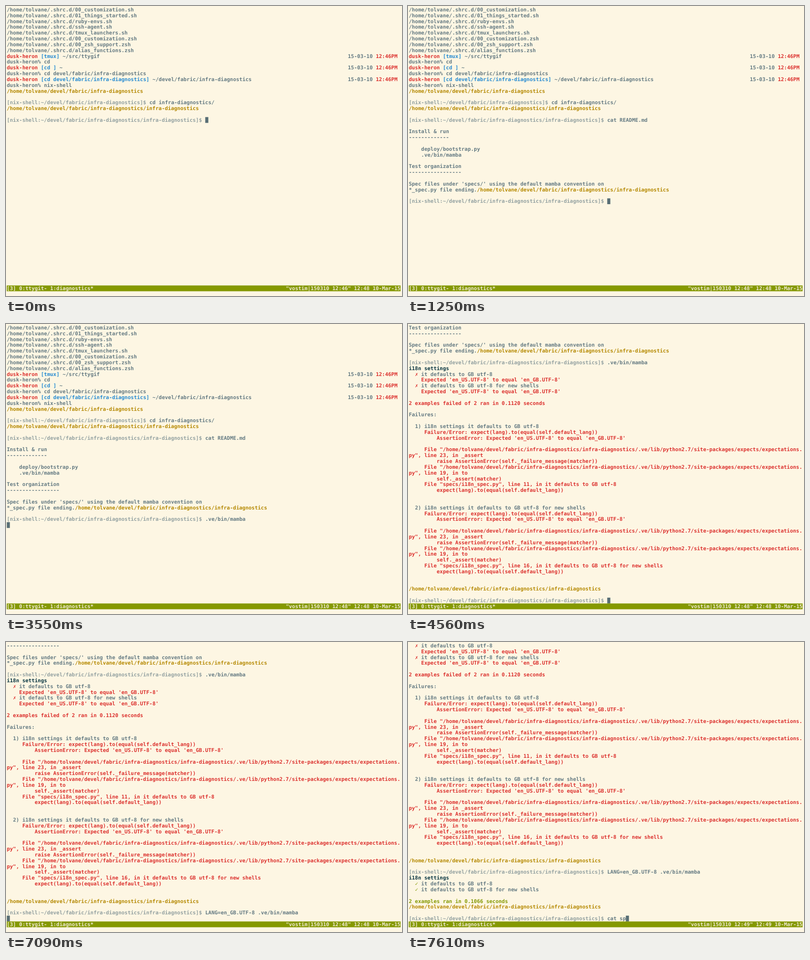
Write an HTML page that moves like this. It is 874 px wide and 641 px high and loops after 8 s.

```html
<!DOCTYPE html>
<html lang="en">
<head>
<meta charset="utf-8">
<title>Terminal session</title>
<style>
  html, body { margin: 0; width: 100%; height: 100%; overflow: hidden; background: #fdf6e3; }
  svg { display: block; }
  text {
    font: bold 11.37px "DejaVu Sans Mono", monospace;
    white-space: pre;
    text-rendering: geometricPrecision;
  }
</style>
</head>
<body>
<svg id="stage" width="874" height="641" viewBox="0 0 874 641"></svg>
<script>
(() => {
const LOOP = 8000, COLS = 127, ROWS = 48;
const CELL_W = 6.844, CELL_H = 12.833, MARGIN = 1.7, BASELINE = 10.27;
const stage = document.getElementById('stage');

// A line is a list of runs: [colour, text].
const ink = color => text => [color, text];
const base = ink('#657b83'), dim = ink('#93a1a1'), red = ink('#dc322f'), blue = ink('#268bd2');
const gold = ink('#b58900'), green = ink('#859900'), dark = ink('#073642'), pale = ink('#eee8d5');

const user = 'tolvane', host = 'dusk-heron';
const project = 'devel/fabric/infra-diagnostics';
const inner = project + '/infra-diagnostics';
const blank = [];
const plain = text => [base(text)];
const error = (indent, text) => [red(' '.repeat(indent) + text)];
const folder = path => [gold(`/home/${user}/${path}`)];
const prompt = (command, path = inner) => [dim(`[nix-shell:~/${path}]$ `), base(command)];

function banner(command, path) {
  const left = [red(host + ' '), blue(`[${command}]`), base(' ' + path)];
  return [...left, base(' '.repeat(110 - width(left)) + '15-03-10 '), red('12:46PM')];
}

function width(line) {
  return line.reduce((sum, [, text]) => sum + text.length, 0);
}

const startup = [
  ...['00_customization.sh', '01_things_started.sh', 'ruby-envs.sh', 'ssh-agent.sh', 'tmux_launchers.sh',
    '00_customization.zsh', '00_zsh_support.zsh', 'alias_functions.zsh']
    .map(file => plain(`/home/${user}/.shrc.d/${file}`)),
  banner('tmux', '~/src/ttygif'),
  plain(host + '% cd'),
  banner('cd ', '~'),
  plain(`${host}% cd ${project}`),
  banner('cd ' + project, '~/' + project),
  plain(host + '% nix-shell'),
  folder(project),
  blank,
  prompt('cd infra-diagnostics/', project),
  folder(inner),
  blank
];

const readme = [
  blank,
  plain('Install & run'),
  plain('-'.repeat(13)),
  blank,
  plain('    deploy/bootstrap.py'),
  plain('    .ve/bin/mamba'),
  blank,
  plain('Test organization'),
  plain('-'.repeat(17)),
  blank,
  plain("Spec files under 'specs/' using the default mamba convention on"),
  [base('*_spec.py file ending.'), ...folder(inner)],
  blank
];

const specs = ['it defaults to GB utf-8', 'it defaults to GB utf-8 for new shells'];
const mismatch = "Expected 'en_US.UTF-8' to equal 'en_GB.UTF-8'";
const result = (mark, spec) => [base('  '), mark, base(' ' + spec)];

function libraryCall(line, method, code) {
  return [
    error(5, `File "/home/${user}/${inner}/.ve/lib/python2.7/site-packages/expects/expectations.`),
    error(0, `py", line ${line}, in ${method}`),
    error(9, code)
  ];
}

function failure(number, spec, line) {
  return [
    plain(`  ${number}) i18n settings ${spec}`),
    error(5, 'Failure/Error: expect(lang).to(equal(self.default_lang))'),
    error(9, 'AssertionError: ' + mismatch),
    blank,
    ...libraryCall(23, '_assert', 'raise AssertionError(self._failure_message(matcher))'),
    ...libraryCall(19, 'to', 'self._assert(matcher)'),
    error(5, `File "specs/i18n_spec.py", line ${line}, in ${spec}`),
    error(9, 'expect(lang).to(equal(self.default_lang))'),
    blank,
    blank
  ];
}

const failedRun = [
  [dark('i18n settings')],
  ...specs.flatMap(spec => [result(red('✗'), spec), error(4, mismatch)]),
  blank,
  error(0, '2 examples failed of 2 ran in 0.1120 seconds'),
  blank,
  plain('Failures:'),
  blank,
  ...failure(1, specs[0], 11),
  ...failure(2, specs[1], 16),
  folder(inner),
  blank
];

const passedRun = [
  [dark('i18n settings')],
  ...specs.map(spec => result(green('✓'), spec)),
  blank,
  [green('2 examples ran in 0.1066 seconds')],
  folder(inner),
  blank
];

const run = '.ve/bin/mamba', runGB = 'LANG=en_GB.UTF-8 ' + run;
const afterReadme = [...startup, prompt('cat README.md'), ...readme];
const afterFailure = [...afterReadme, prompt(run), ...failedRun];
const afterPass = [...afterFailure, prompt(runGB), ...passedRun];

const step = (at, history, last, titleTime, clock) => ({ at, lines: [...history, last], titleTime, clock });
const steps = [
  step(0, startup, prompt(''), '12:46', '12:48'),
  step(500, startup, prompt('cat README.md'), '12:46', '12:48'),
  step(1250, afterReadme, prompt(''), '12:48', '12:48'),
  step(3510, afterReadme, prompt(run), '12:48', '12:48'),
  step(3550, [...afterReadme, prompt(run)], blank, '12:48', '12:48'),
  step(4560, afterFailure, prompt(''), '12:48', '12:48'),
  step(6930, afterFailure, prompt(runGB), '12:48', '12:48'),
  step(7090, [...afterFailure, prompt(runGB)], blank, '12:48', '12:48'),
  step(7260, afterPass, prompt(''), '12:49', '12:49'),
  step(7450, afterPass, prompt('cat '), '12:49', '12:49'),
  step(7610, afterPass, prompt('cat sp'), '12:49', '12:49')
];

function add(tag, attributes, content = '') {
  const node = document.createElementNS('http://www.w3.org/2000/svg', tag);
  for (const name in attributes) node.setAttribute(name, attributes[name]);
  node.textContent = content;
  stage.append(node);
}

const cellX = col => MARGIN + col * CELL_W;
const cellY = row => MARGIN + row * CELL_H;

function drawBlock(col, row, cols, fill) {
  add('rect', { x: cellX(col), y: cellY(row), width: cols * CELL_W, height: CELL_H, fill });
}

function drawLine(line, row) {
  let col = 0;
  for (const [fill, text] of line) {
    const indent = text.length - text.trimStart().length;
    add('text', { x: cellX(col + indent), y: cellY(row) + BASELINE, fill }, text.trim());
    col += text.length;
  }
}

function draw({ lines, titleTime, clock }) {
  stage.replaceChildren();
  const visible = lines.slice(-ROWS);
  visible.forEach(drawLine);
  drawBlock(width(visible.at(-1)), visible.length - 1, 1, '#586e75');

  const windows = '[3] 0:ttygit- 1:diagnostics*';
  const status = `"vostim|150310 ${titleTime}" ${clock} 10-Mar-15`;
  drawBlock(0, ROWS, COLS, '#859900');
  drawLine([pale(windows), pale(status.padStart(COLS - windows.length))], ROWS);
}

let shown;
function tick(now) {
  const time = now % LOOP;
  const current = steps.findLast(({ at }) => at <= time) ?? steps[0];
  if (current !== shown) draw(shown = current);
  requestAnimationFrame(tick);
}
tick(0);
})();
</script>
</body>
</html>
```
